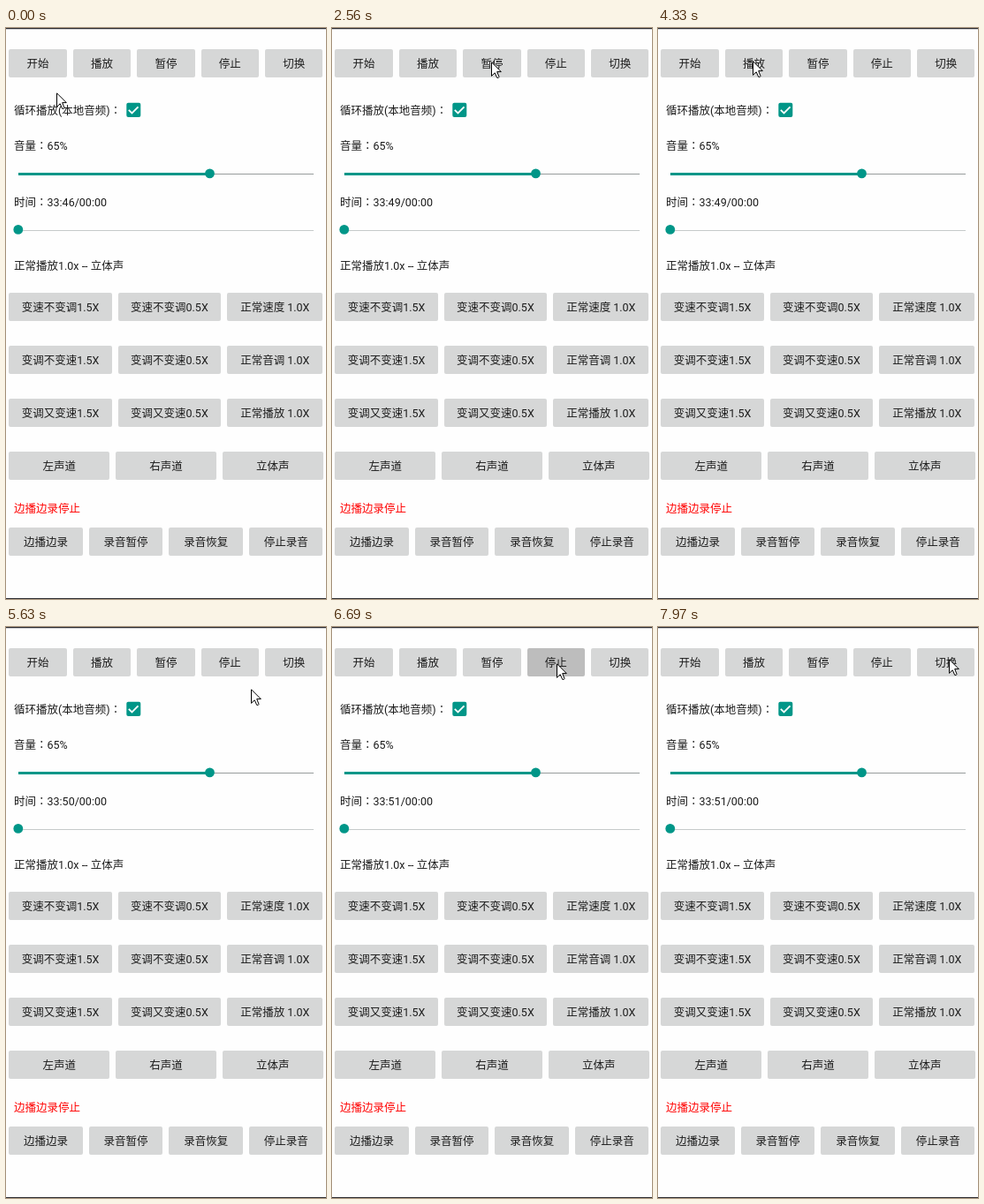
Animation, 362 px wide and 647 px high, one loop 8000 ms. Source, as an HTML page:

```html
<!DOCTYPE html>
<html lang="zh-CN">
<head>
<meta charset="utf-8">
<title>音频播放</title>
<style>
html, body { margin: 0; width: 100%; height: 100%; overflow: hidden; }
body {
  position: relative;
  background: #fefefe;
  color: #1c1c1c;
  font: 12.5px Roboto, "Noto Sans CJK SC", sans-serif;
}
.row {
  position: absolute;
  left: 3.3px;
  width: 355.2px;
  height: 32px;
  display: flex;
  gap: 7px;
}
.row b {
  flex: 1 1 0;
  border-radius: 2px;
  background: #d6d7d7;
  font-weight: 400;
  line-height: 34px;
  text-align: center;
  white-space: nowrap;
}
.speed b { flex-grow: 116.4; }
.speed b:last-child { flex-grow: 108.4; }
p {
  position: absolute;
  left: 9px;
  margin: 0;
  line-height: 20px;
  white-space: pre;
}
p i { font-family: "Noto Sans CJK TC", sans-serif; font-style: normal; }
.rec { color: #f00; }
svg { position: absolute; left: 0; top: 0; }

.pause { animation: pause 8s step-end infinite; }
.stop { animation: stop 8s step-end infinite; }
@keyframes pause {
  35.5% { background: #bdbdbd; }
  0%, 37.3%, 100% { background: #d6d7d7; }
}
@keyframes stop {
  83.6% { background: #bdbdbd; }
  0%, 85.5%, 100% { background: #d6d7d7; }
}

.sec::before { content: "46"; animation: sec 8s step-end infinite; }
@keyframes sec {
  0% { content: "46"; }
  6.75% { content: "47"; }
  20% { content: "48"; }
  32% { content: "49"; }
  68.5% { content: "50"; }
  80.25%, 100% { content: "51"; }
}

/* Each leg moves in a fixed number of jumps, as a screen recorder sees it. */
#cursor { animation: move 8s linear infinite; }
@keyframes move {
  0% { left: 57px; top: 73px; }
  1.5% { left: 57px; top: 73px; animation-timing-function: steps(5, start); }
  9.94% { left: 39px; top: 40px; }
  13.19% { left: 39px; top: 40px; animation-timing-function: steps(2, start); }
  16.19% { left: 106px; top: 42px; }
  16.6% { left: 106px; top: 42px; animation-timing-function: steps(4, start); }
  23.6% { left: 180px; top: 38px; }
  44.31% { left: 180px; top: 38px; animation-timing-function: steps(4, start); }
  50.8% { left: 130px; top: 52px; animation-timing-function: steps(3, start); }
  55.7% { left: 107px; top: 37px; }
  64.94% { left: 107px; top: 37px; animation-timing-function: steps(4, start); }
  71.8% { left: 277px; top: 70px; animation-timing-function: steps(1, start); }
  73.4% { left: 286px; top: 62px; animation-timing-function: steps(3, start); }
  78.3% { left: 257px; top: 45px; }
  78.6% { left: 257px; top: 45px; animation-timing-function: steps(3, start); }
  83.6% { left: 254px; top: 41px; }
  89% { left: 254px; top: 41px; animation-timing-function: steps(2, start); }
  92.3% { left: 287px; top: 97px; animation-timing-function: steps(4, start); }
  99.6% { left: 321px; top: 48px; animation-timing-function: steps(1, start); }
  100% { left: 329px; top: 36px; }
}
</style>
</head>
<body>
<svg width="362" height="647">
  <path d="M0 .5H362" stroke="#2b2b2f"/>
  <path d="M0 1.5H362" stroke="#d0d0d2"/>
  <path d="M0 646.5H362" stroke="#2b2b2f"/>
  <rect x="136.3" y="84.7" width="16" height="16.2" rx="2" fill="#009688"/>
  <path d="M138.8 92.8l3.7 3.7 7-7.2" fill="none" stroke="#fff" stroke-width="1.8"/>
  <path d="M14 165.5H348" stroke="#979c9c"/>
  <path d="M14 165.5H230" stroke="#009688" stroke-width="3"/>
  <path d="M14 229.5H348" stroke="#c6caca"/>
  <g fill="#009688">
    <circle cx="230.5" cy="164.9" r="5.4"/>
    <circle cx="13.8" cy="228.4" r="5.4"/>
  </g>
</svg>

<div class="row" style="top:24px"><b>开始</b><b>播放</b><b class="pause">暂停</b><b class="stop">停止</b><b>切换</b></div>
<p style="top:83px">循环播放(本地音频)<i lang="zh-Hant">：</i></p>
<p style="top:123px">音量<i lang="zh-Hant">：</i>65%</p>
<p style="top:187px">时间<i lang="zh-Hant">：</i>33:<span class="sec"></span>/00:00</p>
<p style="top:260px">正常播放1.0x -- 立体声</p>
<div class="row speed" style="top:300px"><b>变速不变调1.5X</b><b>变速不变调0.5X</b><b>正常速度 1.0X</b></div>
<div class="row speed" style="top:360px"><b>变调不变速1.5X</b><b>变调不变速0.5X</b><b>正常音调 1.0X</b></div>
<div class="row speed" style="top:420px"><b>变调又变速1.5X</b><b>变调又变速0.5X</b><b>正常播放 1.0X</b></div>
<div class="row" style="top:480px"><b>左声道</b><b>右声道</b><b>立体声</b></div>
<p class="rec" style="top:535px">边播边录停止</p>
<div class="row" style="top:566px"><b>边播边录</b><b>录音暂停</b><b>录音恢复</b><b>停止录音</b></div>

<svg id="cursor" width="12" height="19">
  <path d="M.5 .8V16.4L4.2 12.8 6.7 18.4H8.3L9 17.4 6.7 11.6H11.3Z" fill="#fff" stroke="#000"/>
</svg>
</body>
</html>
```
